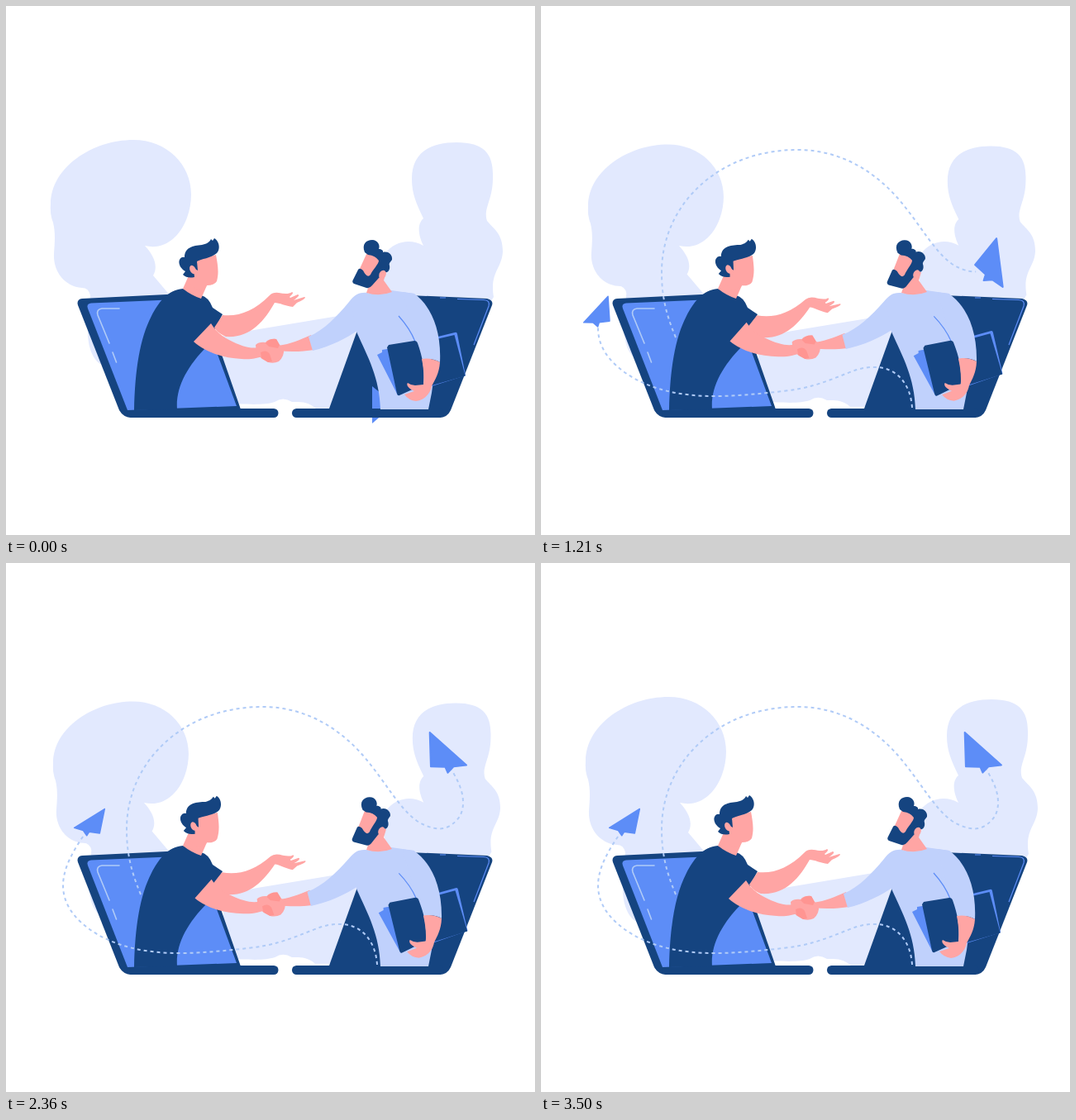
An HTML page for the animation above (3.57 s loop, 640 by 640 pixels).

```html
<!DOCTYPE html>
<html lang="en">
<head>
<meta charset="utf-8">
<title>Online handshake</title>
<style>
  html, body { margin: 0; height: 100%; overflow: hidden; background: #fff; }
  svg { display: block; width: 100%; height: 100%; }
  .mist { fill: #e2e9fe; }
  .navy { fill: #154480; }
  .blue { fill: #5d8df7; }
  .skin { fill: #ffa5a4; }
  .blush { fill: #ff9592; }
  .shirt { fill: #c0d1fc; }
  .line, .trail { fill: none; stroke: #b0cbf7; stroke-width: 1.6; stroke-linecap: round; }
  .trail { stroke-width: 2; stroke-linecap: butt; }
  .thin { fill: none; stroke: #5d8df7; stroke-width: 1.2; }
  .base { stroke: #154480; stroke-width: 11; stroke-linecap: round; }
  .plane { stroke: #5d8df7; stroke-width: 2; stroke-linejoin: round; }
</style>
</head>
<body>
<svg viewBox="0 0 640 640">
  <defs>
    <path id="dart" d="M-5.5-19.2 31-.2-25 19.2-19 5-22-5-14.5-4.2Z"/>
  </defs>

  <!-- clouds: data-shrink = x-loss y-loss cx cy -->
  <path class="mist" data-shrink=".047 .055 139 290" d="M54 240C54 195 105 162 154 162C195 162 224 192 224 228C224 262 202 298 168 290C178 301 185 314 178 326L200 352 140 440 116 434C104 428 98 410 99 388L102 350Q100 341 92 341C70 339 57 320 58 300C59 285 60 275 57 262Q53 252 54 240Z"/>
  <path class="mist" data-shrink=".045 .05 515 285" d="M491 209C491 180 510 165 545 165C580 165 590 180 589 208C589 235 577 245 582 260C590 270 601 275 601 297C600 318 585 322 590 352L560 400H470L455 330 458 300C470 284 490 281 505 290C500 280 496 265 505 257C497 240 491 228 491 209Z"/>
  <path class="mist" data-shrink=".04 .05 340 430" d="M260 400 300 392 420 372 440 420 400 487H375C365 478 355 479 346 479Q335 472 325 479C312 483 300 482 262 481Z"/>

  <!-- laptops -->
  <path class="navy" d="M92 354 235 347 284 488V498H152Q142 498 137 489L87 362Q85 355 92 354Z"/>
  <path class="base" d="M152 492.500H324"/>
  <path class="blue" d="M103 359.500 231 354 279 484 147 489 99 366Q97 360 103 359.500Z"/>
  <path class="line" d="M137 366H116Q109 367 111 374L125 408M129 419 133.500 431"/>
  <path class="navy" d="M441 348 582 354Q590 356 588 362L538 489Q534 498 524 498H391V487Z"/>
  <path class="thin" d="M525 353H532M546 354.500 578 355.500Q586 356 584 363L566 410"/>

  <g id="right-trail">
    <path class="trail" d="M163 401C149 368 146 345 146 322C146 240 215 174 310 174C365 174 405 202 433 234C460 266 475 296 497 312C512 321 525 324 535 319C548 312 553 302 553 290C553 268 538 250 528 232"/>
    <use class="blue plane" href="#dart"/>
  </g>

  <!-- left man -->
  <path class="navy" d="M214 342C195 344 185 358 176 375C162 402 156 440 155 489L207 488C205 462 219 436 243 412L253 390 262 373 250 365Q245 352 236 350Z"/>
  <path class="skin" d="M222 324 214 342Q224 350 236 354L244 336Z"/>
  <g data-turn="3.5 236 342">
    <path class="skin" d="M229 308 254 301C256 312 258 322 255 333Q252 338 243 338L233 345 220 335 226 320Z"/>
    <path class="navy" d="M216 304C216 292 226 290 237 289C242 288 246 286 248 282L250 284 252 281C259 285 259 295 255 299C248 305 236 306 231 309L232 320 227 317 228 328Q219 330 214 325L217 321C211 318 208 311 210 307Q212 303 216 304Z"/>
    <ellipse class="skin" cx="226" cy="319" rx="3.500" ry="5.500" transform="rotate(-25 226 319)"/>
  </g>

  <path id="spare" class="blue" d="M443 460 470 482 443 505Z"/>
  <path class="base" d="M351.500 492.500H524"/>
  <g id="left-trail">
    <path class="trail" d="M449 486C447 455 428 436 402 437C375 436 350 460 293 466C265 469 238 472 208 472C165 472 120 462 90 434C70 415 66 395 71 375C75 357 92 331 105 315"/>
    <use class="blue plane" href="#dart"/>
  </g>

  <!-- right man -->
  <g data-turn="2.6 430 355">
    <path class="skin" d="M369 398C355 404 345 409 329 411V417C345 419 360 418 373 416Z"/>
    <path class="shirt" d="M438 347C425 346 422 350 415 358C400 376 385 392 366 400L371 417C392 412 412 402 426 392L445 360Z"/>
  </g>
  <path class="shirt" d="M436 348C425 347 422 350 418 358L424 394C438 425 452 450 453 488H511L515 468 520 430 505 370 494 348 466 344Z"/>
  <path class="skin" d="M441 333 436 347Q452 352 467 346L457 332 460 322 445 318Z"/>
  <g data-turn="-2.300 490 365">
    <path class="blue" d="M510 403 543 395Q545.500 394 546 397L556 447 512 461Z"/>
    <path class="navy" d="M508 406 542.500 398 555.700 447.500 512 460Z"/>
    <path class="shirt" d="M480 346 494 348C513 362 527 390 525 431Q515 425 503 428L495 405Z"/>
    <path class="thin" d="M475 375C485 386 491 396 495 406"/>
    <path class="blue" d="M449 422 455 419V416L480 412V469L474 471Z"/>
    <path class="navy" d="M463 410 494 405Q497 405 498 408C504 425 507 440 505 458L476 471Q474 472 473 469L461 413Z"/>
    <path class="skin" d="M503 427Q514 425 525 431C524 445 519 452 515 460C513 470 505 477 496 478Q487 477 482 470L494 466 492 465C486 462 484 458 486 456Q490 459 495 459L505 458C506 447 505 437 503 427Z"/>
  </g>
  <g data-turn="-4 447 345">
    <path class="skin" d="M437 298 451 303 453 318 440 330 427 320Z"/>
    <path class="navy" d="M434 298C430 288 436 283 443 283C450 283 453 290 451 294C454 294 457 296 456 298C463 296 468 302 467 307C465 310 463 311 464 314C465 319 462 323 459 322L451 329 443 338Q440 342 436 341L421 336Q418 334 420 331L426 319Q428 316 432 320Q437 330 441 325C443 320 451 312 451 308Q447 302 438 301Z"/>
    <ellipse class="skin" cx="455.500" cy="325" rx="4" ry="5.500" transform="rotate(25 455.500 325)"/>
  </g>

  <!-- left man's arms and the handshake -->
  <path class="skin" data-turn="6 258 365" d="M262 374C282 376 300 369 319 350Q323 346 330 347C336 348 342 349 346 346Q349 347 343 352L344 353 353 349Q357 350 348 356L361 352Q365 353 352 359L347 364C338 363 331 359 325 359C312 382 295 402 266 400Q256 396 252 389Z"/>
  <g data-turn="-3 217 368">
    <path class="skin" d="M227 406 248 384C254 394 262 400 270 404C285 412 297 415 305 413L318 410V422C305 426 296 428 285 427C262 426 240 418 227 406Z"/>
    <path class="skin" d="M302 410Q306 406 314 407Q318 402 327 403L331 410 336 414Q337 424 330 430Q324 433 317 431L310 427 303 421Z"/>
    <path class="blush" d="M314 408Q319 402 327 403L331 410 329 414 318 412ZM308 419Q315 415 319 421L322 430 317 431 309 426Z"/>
  </g>
</svg>
<script>
  const FRAMES = 50, STEP = 71.4, DASH = 4, GAP = 4, FLIGHT = 33.5;
  const $ = s => document.querySelector(s);
  const nums = s => s.split(' ').map(Number);
  const turns = [...document.querySelectorAll('[data-turn]')].map(el => [el, ...nums(el.dataset.turn)]);
  const clouds = [...document.querySelectorAll('[data-shrink]')].map(el => [el, ...nums(el.dataset.shrink)]);

  function makeTrail(id, sx, sy, lead) {
    const [path, plane] = $(id).children, total = path.getTotalLength();
    return { path, plane, total, sx, sy, lead };
  }
  const trails = [makeTrail('#right-trail', 1, 1, 22), makeTrail('#left-trail', .73, -.73, 16)];

  // cubic-bezier(1/3, 0, 0, 1)
  function ease(x) {
    if (x >= 1) return 1;
    let lo = 0, hi = 1;
    for (let i = 0; i < 24; i++) {
      const u = (lo + hi) / 2;
      if (u * (1 - u) ** 2 + u ** 3 < x) lo = u; else hi = u;
    }
    return lo * lo * (3 - 2 * lo);
  }

  // the nose points a little ahead along the path
  function fly({ path, plane, total, sx, sy, lead }, p) {
    const drawn = p * (total - lead), at = drawn + lead;
    const count = Math.floor(drawn / (DASH + GAP));
    const rest = Math.min(DASH, drawn - count * (DASH + GAP));
    path.setAttribute('stroke-dasharray', `${DASH} ${GAP} `.repeat(count) + `${rest} 9999`);
    const c = path.getPointAtLength(at);
    const a = path.getPointAtLength(at - 1);
    const b = path.getPointAtLength(Math.min(total, at + 36 * sx));
    const angle = Math.atan2(b.y - a.y, b.x - a.x) * 180 / Math.PI;
    plane.setAttribute('transform', `translate(${c.x} ${c.y}) rotate(${angle}) scale(${sx} ${sy})`);
  }

  function draw(now) {
    const t = now % 3570;
    const k = Math.min(FRAMES - 1, Math.floor(t / STEP + .06));
    const sway = (1 - Math.cos(2 * Math.PI * k / FRAMES)) / 2;
    for (const [el, angle, x, y] of turns)
      el.setAttribute('transform', `rotate(${angle * sway} ${x} ${y})`);
    for (const [el, dx, dy, x, y] of clouds)
      el.setAttribute('transform', `translate(${x} ${y}) scale(${1 - dx * sway} ${1 - dy * sway}) translate(${-x} ${-y})`);
    for (const trail of trails) {
      trail.path.parentNode.style.display = k ? '' : 'none';
      fly(trail, ease(k / FLIGHT));
    }
    $('#spare').style.display = k ? 'none' : '';
  }

  const start = performance.now();
  function tick() {
    draw(performance.now() - start);
    requestAnimationFrame(tick);
  }
  tick();
</script>
</body>
</html>
```
